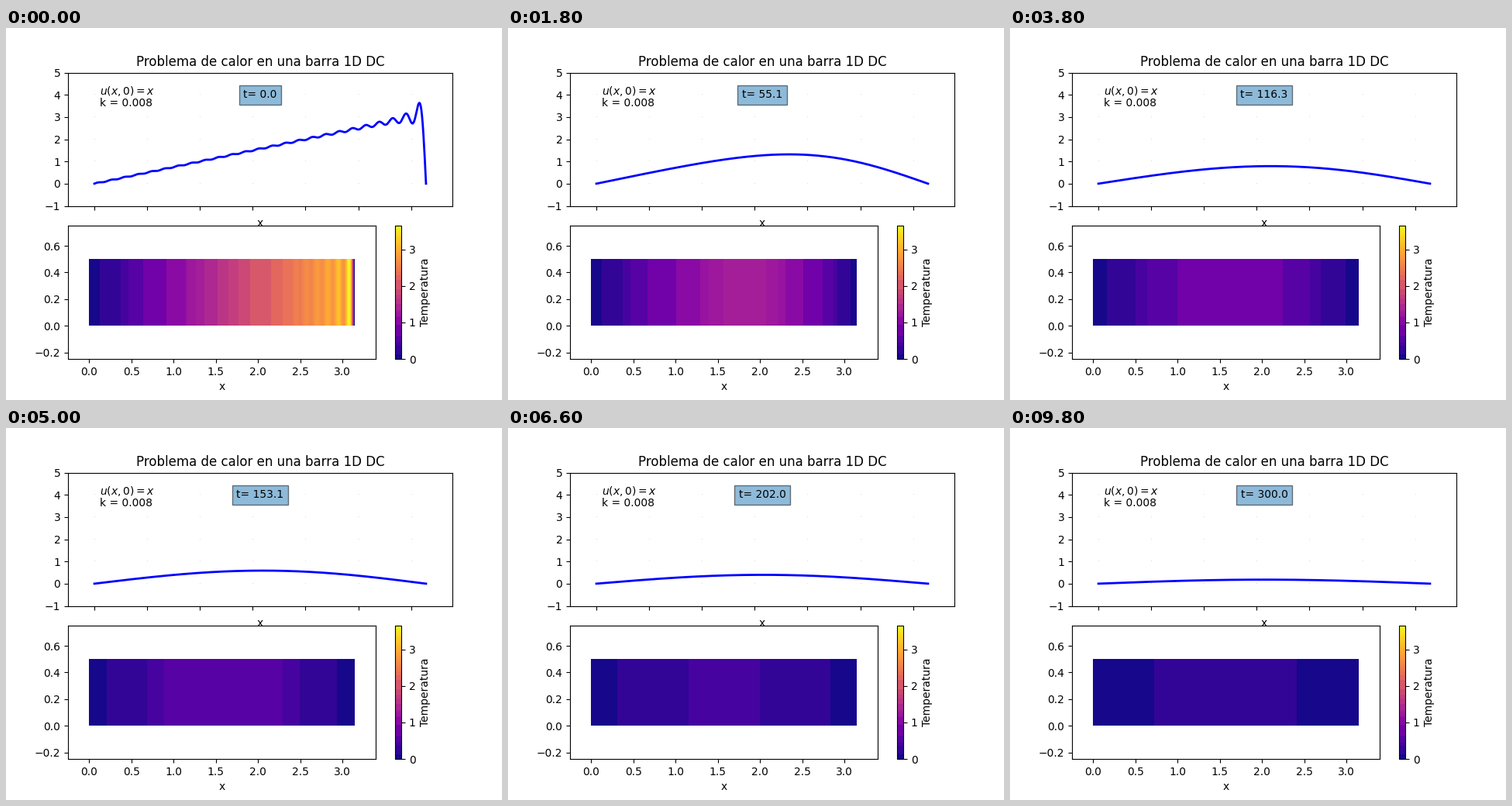
These frames come from a looping animation (640 by 480 pixels, 10000 ms). A matplotlib script:

```python
import numpy as np
import matplotlib.pyplot as plt
from matplotlib.animation import FuncAnimation
from matplotlib.colors import ListedColormap

K = 0.008
TERMS = 49
FRAMES = 50
times = np.linspace(0, 300, FRAMES)

n = np.arange(1, TERMS + 1)
coef = 2 * (-1.0) ** (n + 1) / n
x = np.linspace(0, np.pi, 500)
modes = np.sin(np.outer(x, n))


def heat(t):
    return modes @ (coef * np.exp(-K * n**2 * t))


def banded_plasma(top, steps, size=512):
    """Plasma with flat bands between the steps, smooth above the last."""
    level = np.linspace(0, top, size)
    rgba = plt.get_cmap("plasma")(np.linspace(0, 1, size))
    for lo, hi in zip(steps, steps[1:]):
        band = (level >= lo) & (level < hi)
        rgba[band] = rgba[band].mean(axis=0)
    return ListedColormap(rgba)


plt.rcParams["font.family"] = "DejaVu Sans"
fig, (ax, bar_ax) = plt.subplots(2, 1, figsize=(6.4, 4.8), dpi=100)
fig.subplots_adjust(left=0.125, right=0.9, bottom=0.11, top=0.88, hspace=0.15)

# Temperature profile
u0 = heat(0)
ax.set_title("Problema de calor en una barra 1D DC")
ax.set_xlim(-0.25, np.pi + 0.25)
ax.set_ylim(-1, 5)
ax.set_xticks(np.arange(0, 3.1, 0.5))
ax.set_xticklabels([])
ax.set_yticks(range(-1, 6))
ax.set_xlabel("x")
gx, gy = np.meshgrid(np.arange(0, 3.1, 0.5), np.arange(0, 5))
ax.plot(gx.ravel(), gy.ravel(), ",", color="0.86", zorder=0.5)
line, = ax.plot(x, u0, color="blue", lw=2)
ax.text(0.05, 4, "$u(x,0) = x$")
ax.text(0.05, 3.5, "k = 0.008")
clock = ax.text(np.pi / 2, 4, "", ha="center", va="center",
                bbox={"facecolor": "C0", "alpha": 0.5})

# Coloured bar
top = u0.max()
steps = [0, 0.116, 0.357, 0.443, 0.64, 0.937, 1.138, 1.19, 1.27, 1.34, 1.513,
         1.663, 1.76, 1.92, 2.155, 2.29, 2.4, 2.46, 2.53]
half = x[1] / 2
edges = np.clip(np.append(x - half, np.pi), 0, np.pi)
mesh = bar_ax.pcolormesh(edges, [0, 0.5], u0[None, :], vmin=0, vmax=top,
                         cmap=banded_plasma(top, steps))
bar_ax.set_xlim(-0.25, np.pi + 0.25)
bar_ax.set_ylim(-0.25, 0.75)
bar_ax.set_xlabel("x")
fig.colorbar(mesh, ax=bar_ax, label="Temperatura")


def update(i):
    u = heat(times[i])
    line.set_ydata(u)
    mesh.set_array(u[None, :])
    clock.set_text(f"t= {times[i]:.1f}")
    return line, mesh, clock


anim = FuncAnimation(fig, update, frames=FRAMES, interval=200,
                     repeat=True, repeat_delay=0, blit=False)
plt.show()
```
